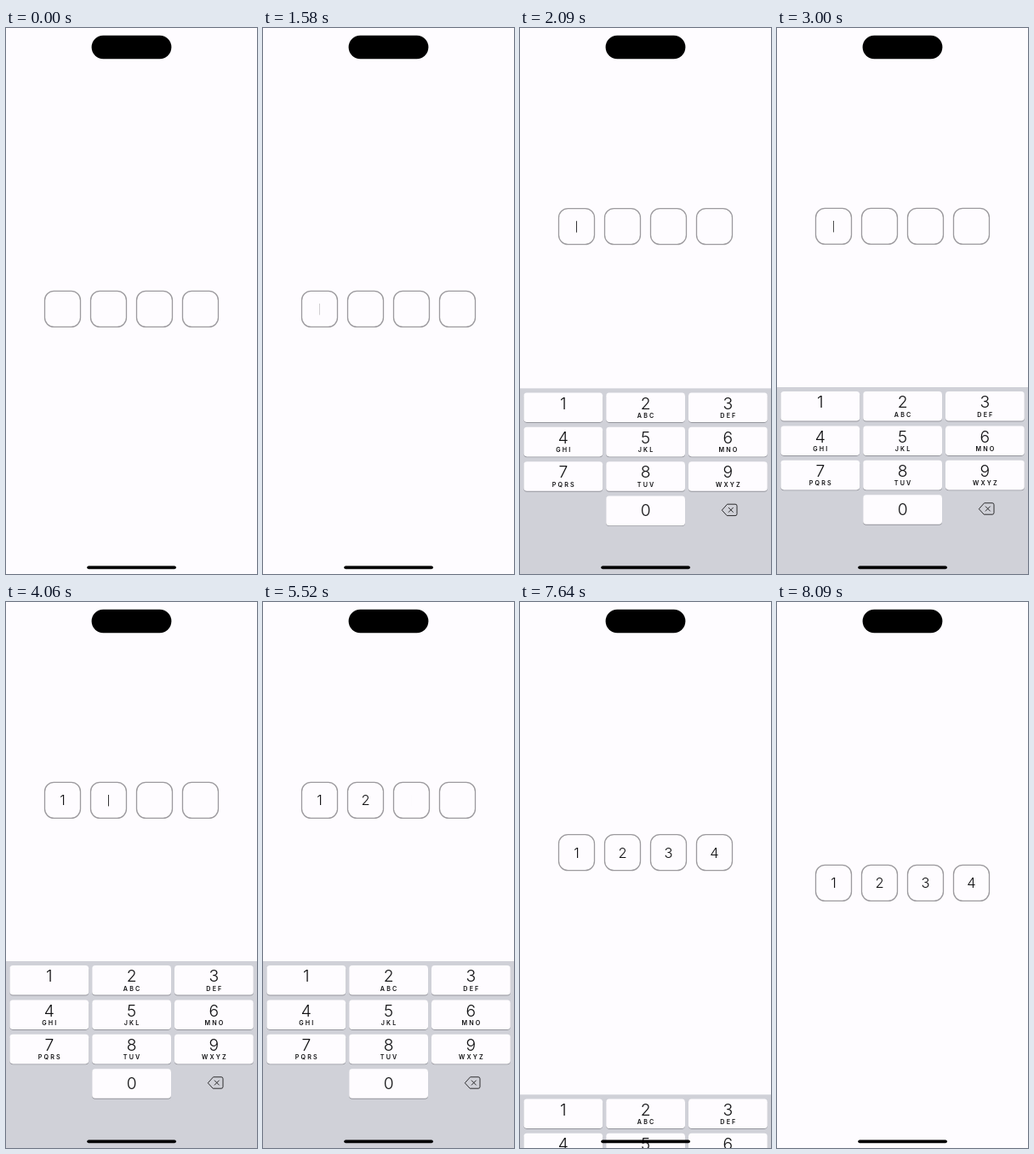
Write an HTML page that moves like this. It is 295 px wide and 640 px high and loops after 8150 ms.

```html
<!DOCTYPE html>
<html lang="en">
<head>
<meta charset="utf-8">
<title>Passcode entry</title>
<style>
  html, body { margin: 0; width: 100%; height: 100%; overflow: hidden; background: #fefcff; }
  svg { display: block; width: 295px; height: 640px; }
  text { font-family: Inter, Roboto, sans-serif; fill: #111113; text-anchor: middle; }
  .cell { fill: none; stroke: #9c9a9e; stroke-width: 1.3; }
  .digit { font-size: 16.5px; font-weight: 350; }
  .num { font-size: 19.3px; font-weight: 300; }
  .abc { font-size: 7.2px; font-weight: 600; letter-spacing: 2.1px; }
  .icon { fill: none; stroke: #2c2c2e; stroke-width: 1; stroke-linejoin: round; stroke-linecap: round; }
</style>
</head>
<body>
<svg viewBox="0 0 295 640" xmlns="http://www.w3.org/2000/svg">
  <rect width="295" height="640" fill="#fefcff"/>
  <g id="cells"></g>
  <g id="pad"><rect width="295" height="240" fill="#d0d1d8"/></g>
  <rect x="100.6" y="8.7" width="93.8" height="27.5" rx="13.7"/>
  <rect x="95.3" y="630.4" width="104.6" height="3.8" rx="1.9"/>
</svg>
<script>
const LOOP = 8150;
const PAD_H = 219, LIFT = 97, REST_Y = 308.4;
const FOCUS = 1580, SHOW = 1700, HIDE = 7504;
const HOLD = 190, FADE = 210;
const releases = [3360, 4700, 6270, 7520];
// Caret blinks: [starts fading out, starts fading in]
const blinks = [[2420, 2820], [3570, 3850], [4480, 4900], [4900, 5520], [5960, 6400], [6570, 6930]];

const cells = document.getElementById('cells');
const pad = document.getElementById('pad');

function add(parent, tag, attrs, text = '') {
  const el = document.createElementNS('http://www.w3.org/2000/svg', tag);
  for (const k in attrs) el.setAttribute(k, attrs[k]);
  el.textContent = text;
  parent.appendChild(el);
  return el;
}

const cellX = i => 66.5 + 54 * i;
const digits = releases.map((_, i) => {
  add(cells, 'rect', { class: 'cell', x: cellX(i) - 21, y: 0, width: 42, height: 42, rx: 10.8 });
  return add(cells, 'text', { class: 'digit', x: cellX(i), y: 27.1 }, i + 1);
});
const caret = add(cells, 'rect', { y: 14.6, width: 1, height: 13.4, fill: '#333335' });

function addKey(col, row, num, abc) {
  const x = 4.4 + 96.8 * col, y = 5 + 40.4 * row, mid = x + 46.4;
  const box = { x, width: 92.8, height: 34.6, rx: 3.8 };
  add(pad, 'rect', { ...box, y: y + 0.9, fill: '#95969d' });
  const face = add(pad, 'rect', { ...box, y });
  add(pad, 'text', { class: 'num', x: mid, y: y + (abc === undefined ? 23.8 : 19.2) }, num);
  if (abc) add(pad, 'text', { class: 'abc', x: mid + 1, y: y + 29.6 }, abc);
  return face;
}
const letters = ['', 'ABC', 'DEF', 'GHI', 'JKL', 'MNO', 'PQRS', 'TUV', 'WXYZ'];
const keys = letters.map((abc, i) => addKey(i % 3, Math.floor(i / 3), i + 1, abc));
addKey(1, 3, 0).setAttribute('fill', '#fefcff');
add(pad, 'path', {
  class: 'icon',
  d: 'M237.6 142.5l6-6.7H253q2 0 2 2v9.4q0 2-2 2h-9.4zM245.2 139.9l5.2 5.2m0-5.2l-5.2 5.2'
});

const ramp = (t, from) => Math.min(1, Math.max(0, (t - from) / FADE));

// Critically damped spring from 0 to 1
function spring(ms, rate = 0.0183) {
  const a = Math.max(0, ms) * rate;
  return 1 - (1 + a) * Math.exp(-a);
}

function caretAlpha(t, typed) {
  if (t < FOCUS || typed === releases.length) return 0;
  const since = typed ? releases[typed - 1] : 0;
  const wake = Math.max(0.22, ramp(t, 1830));
  // Each release restarts the blink, so earlier ones no longer count
  return blinks.filter(([out]) => out >= since)
    .reduce((a, [out, back]) => a * (1 - ramp(t, out) + ramp(t, back)), wake);
}

function render(t) {
  const padUp = spring(t - SHOW) - spring(t - HIDE);
  const lift = spring(t - SHOW, 0.021) - spring(t - HIDE - 20);
  pad.setAttribute('transform', `translate(0 ${640 - PAD_H * padUp})`);
  cells.setAttribute('transform', `translate(0 ${REST_Y - LIFT * lift})`);

  releases.forEach((up, i) => {
    digits[i].setAttribute('visibility', t >= up ? 'visible' : 'hidden');
    keys[i].setAttribute('fill', t >= up - HOLD && t < up ? '#b2b4be' : '#fefcff');
  });
  keys.slice(releases.length).forEach(key => key.setAttribute('fill', '#fefcff'));

  const typed = releases.filter(up => t >= up).length;
  caret.setAttribute('x', cellX(typed) - 0.5);
  caret.setAttribute('opacity', caretAlpha(t, typed));
}

const start = performance.now();
function tick() {
  render((performance.now() - start) % LOOP);
  requestAnimationFrame(tick);
}
tick();
</script>
</body>
</html>
```
